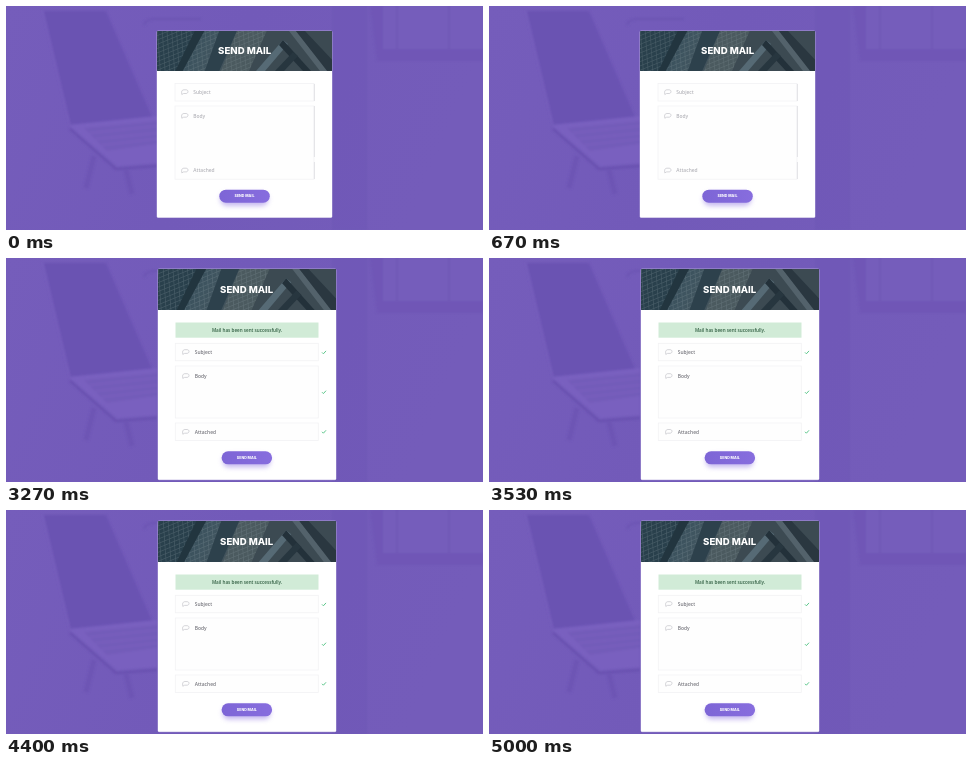
These frames come from a looping animation (477 px wide and 224 px high, 5990 ms). An HTML page:

```html
<!DOCTYPE html>
<html lang="en">
<head>
<meta charset="utf-8">
<title>Send mail form</title>
<style>
  html, body { margin: 0; width: 100%; height: 100%; overflow: hidden; background: #735bb9; }
  svg { display: block; }
  text { font-family: "Open Sans", sans-serif; }
  .title { font: 800 9.6px Inter, sans-serif; fill: #fff; text-anchor: middle; }
  .send { font: 800 3.6px Inter, sans-serif; fill: #fff; text-anchor: middle; }
  .label { font-size: 4.9px; font-weight: 600; }
  .card { fill: #fff; stroke: #fff; stroke-opacity: .4; }
  .field { fill: #fefefe; stroke: #f2f2f4; stroke-width: .8; }
  .tick { fill: none; stroke: #5cc78b; stroke-width: 1; }
  #empty .label { fill: #b4b4ba; }
  #sent .label { fill: #77777e; }
  #empty { animation: empty 5.99s step-end infinite; }
  #sent { animation: sent 5.99s step-end infinite; }
  /* hard cut at 3000 ms */
  @keyframes empty { 0% { visibility: visible } 50.0835% { visibility: hidden } }
  @keyframes sent { 0% { visibility: hidden } 50.0835% { visibility: visible } }
</style>
</head>
<body>
<svg width="477" height="224" viewBox="0 0 477 224">
  <defs>
    <linearGradient id="room" x2="1" y2=".2">
      <stop stop-color="#755dbb"/>
      <stop offset=".5" stop-color="#725ab9"/>
      <stop offset="1" stop-color="#745cba"/>
    </linearGradient>
    <linearGradient id="sky" x2="1" y2=".12">
      <stop stop-color="#263f4e"/>
      <stop offset=".32" stop-color="#3f5560"/>
      <stop offset=".65" stop-color="#455057"/>
      <stop offset="1" stop-color="#39454e"/>
    </linearGradient>
    <linearGradient id="violet">
      <stop stop-color="#7d65d6"/>
      <stop offset="1" stop-color="#876dde"/>
    </linearGradient>
    <pattern id="panes" width="5" height="4" patternUnits="userSpaceOnUse" patternTransform="rotate(-22) skewX(-18)">
      <path d="M0 .4H5M.4 0V4" stroke="#81949a" stroke-width=".6" opacity=".35"/>
    </pattern>
    <filter id="soft" x="-30%" y="-30%" width="160%" height="160%"><feGaussianBlur stdDeviation="1"/></filter>
    <filter id="haze" x="0" y="0" width="100%" height="100%"><feGaussianBlur stdDeviation=".6"/></filter>
    <filter id="glow" x="-30%" y="-80%" width="160%" height="260%"><feGaussianBlur stdDeviation="2.5"/></filter>

    <symbol id="towers" viewBox="0 0 175 40" preserveAspectRatio="none">
      <rect width="175" height="40" fill="url(#sky)"/>
      <g filter="url(#haze)">
        <path d="M-5 -5H40L18 45H-5Z" fill="#29404c"/>
        <path d="M-5 -5H64L46 45H-5Z" fill="url(#panes)"/>
        <path d="M40 -5H50L23 45H16Z" fill="#22353f"/>
        <path d="M64 -5H82L60 45H46Z" fill="#2d414c"/>
        <path d="M82 -5H112L90 45H62Z" fill="#4b5a5f"/>
        <path d="M82 -5H112L90 45H62Z" fill="url(#panes)"/>
        <path d="M112 -5H180V45H90Z" fill="#3c4a52"/>
        <path d="M99 40L126 9L131 13L108 40Z" fill="#566a75"/>
        <path d="M126 9L154 40H146L122 14Z" fill="#23313a"/>
        <path d="M132 0H139L171 40H163Z" fill="#53626b"/>
        <path d="M139 0H148L180 34V45H174Z" fill="#2a3740"/>
        <path d="M118 40L136 21L141 25L127 40Z" fill="#27363f"/>
      </g>
    </symbol>

    <path id="bubble" d="M.8 5.2L.6 3C.6 1.2 1.7.5 3 .5H5C6.3.5 7 1.3 7 2.3S6.2 4.2 5 4.2H2.6Z" fill="none" stroke="#c4c4ca" stroke-width=".7"/>
    <path id="tick" class="tick" d="M-2 0L-.6 1.4L2 -1.5"/>
    <g id="button">
      <rect x="1" y="3" width="48" height="13" rx="6.5" fill="#8a70df" opacity=".5" filter="url(#glow)"/>
      <rect width="50.5" height="13" rx="6.5" fill="url(#violet)"/>
      <text class="send" x="25.2" y="7.8">SEND MAIL</text>
    </g>
  </defs>

  <rect width="477" height="224" fill="url(#room)"/>
  <g filter="url(#soft)">
    <path d="M37 5H100L146 111L64 119Z" fill="#6b53b2"/>
    <path d="M37 5L64 119" stroke="#7a62bf" fill="none"/>
    <path d="M63 119L151 110V157L111 160Z" fill="#7961bf"/>
    <path d="M78 122L151 115V138L101 145Z" fill="#735bb9"/>
    <path d="M84 127L151 120M90 133L151 127M96 139L151 133" stroke="#7c64c1" fill="none"/>
    <path d="M64 123L110 163L151 160" stroke="#674fae" stroke-width="2" fill="none"/>
    <path d="M88 150L80 182M120 164L126 188" stroke="#6d55b4" stroke-width="5"/>
    <path d="M138 19Q140 13 148 13H195" stroke="#6c54b3" stroke-width="2" fill="none"/>
    <path d="M326 0H361V224H326Z" fill="#6f57b6" opacity=".5"/>
    <path d="M364 0H477V55H371Z" fill="#6f57b6"/>
    <path d="M377 0H477V43H377Z" fill="#755dbb"/>
    <path d="M391 0V43M443 0V43" stroke="#6f57b6" stroke-width="2"/>
  </g>

  <g id="empty">
    <rect class="card" x="151" y="25" width="175" height="186.5" rx="1"/>
    <use href="#towers" x="151" y="25" width="175" height="40"/>
    <text class="title" x="238.7" y="48.3">SEND MAIL</text>
    <g class="field">
      <rect x="169" y="77.5" width="139" height="17.5"/>
      <rect x="169" y="100" width="139" height="73.2"/>
    </g>
    <path d="M308.4 78V95M308.4 100V151M308.4 156V173" stroke="#e2e2e6"/>
    <use href="#bubble" x="175" y="83.3"/>
    <use href="#bubble" x="175" y="107"/>
    <use href="#bubble" x="175" y="161.7"/>
    <g class="label">
      <text x="187.3" y="88">Subject</text>
      <text x="187.3" y="111.7">Body</text>
      <text x="187.3" y="166.3">Attached</text>
    </g>
    <use href="#button" x="213.3" y="183.7"/>
  </g>

  <g id="sent">
    <rect class="card" x="152" y="11" width="178" height="210.7" rx="1"/>
    <use href="#towers" x="152" y="11" width="178" height="41"/>
    <text class="title" x="240.7" y="34.5">SEND MAIL</text>
    <rect x="169.5" y="64.5" width="143" height="15.2" fill="#d1ebd7"/>
    <text x="241" y="74" font-size="4.6" font-weight="600" fill="#315f42" text-anchor="middle">Mail has been sent successfully.</text>
    <g class="field">
      <rect x="169.3" y="85.3" width="143" height="17.5"/>
      <rect x="169.3" y="108" width="143" height="52"/>
      <rect x="169.3" y="165" width="143" height="17.5"/>
    </g>
    <use href="#bubble" x="176" y="91.2"/>
    <use href="#bubble" x="176" y="115.2"/>
    <use href="#bubble" x="176" y="171"/>
    <g class="label">
      <text x="188.7" y="95.7">Subject</text>
      <text x="188.7" y="119.7">Body</text>
      <text x="188.7" y="175.6">Attached</text>
    </g>
    <use href="#tick" x="318" y="94.4"/>
    <use href="#tick" x="318" y="134.2"/>
    <use href="#tick" x="318" y="173.8"/>
    <use href="#button" x="215.6" y="193.3"/>
  </g>
</svg>
</body>
</html>
```
